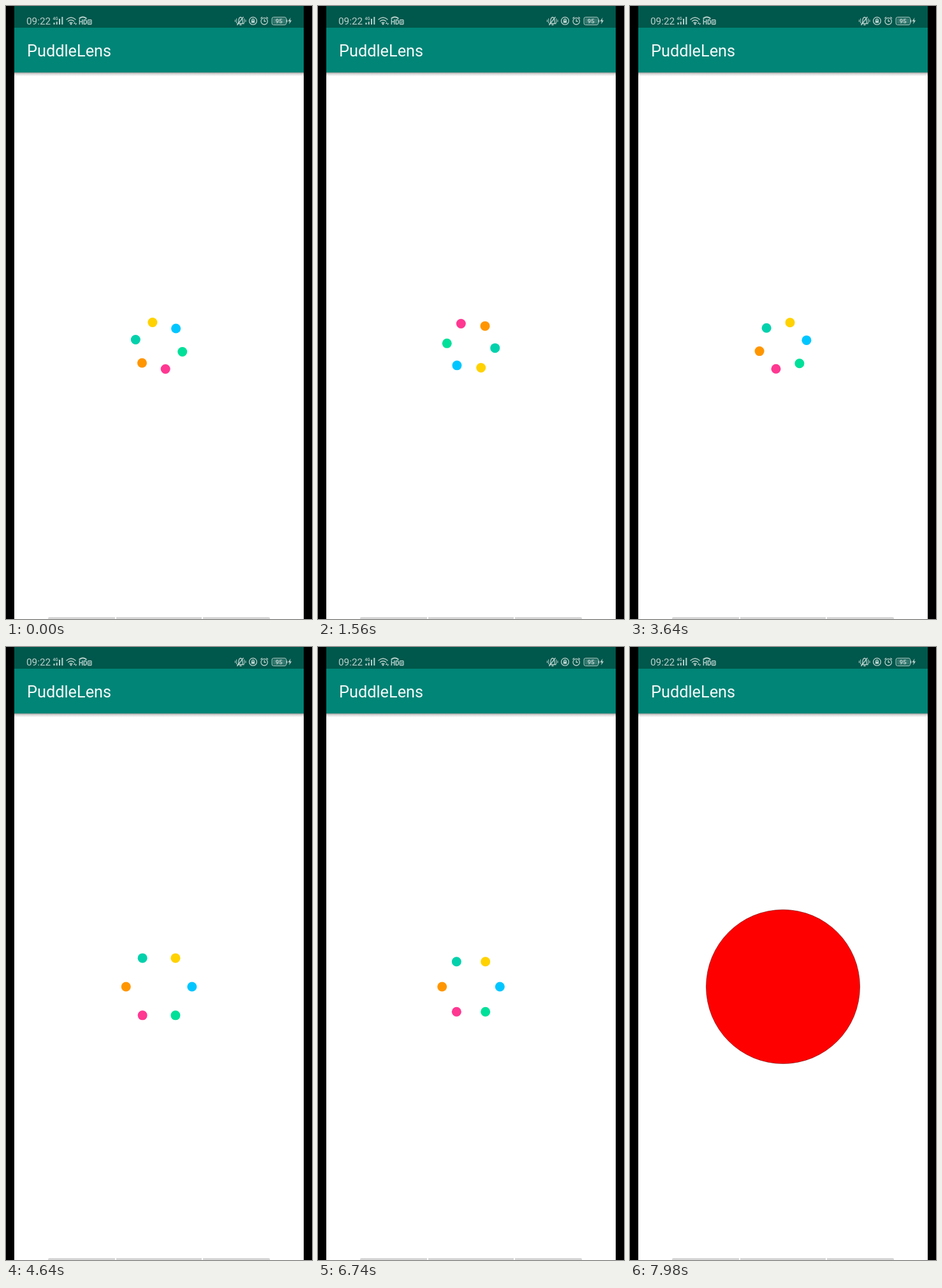
Animation, 480 px wide and 960 px high, one loop 8 s. Source, as an HTML page:

```html
<!DOCTYPE html>
<html lang="en">
<head>
<meta charset="utf-8">
<title>Loading dots</title>
<style>
  html, body { margin: 0; width: 100%; height: 100%; overflow: hidden; background: #000; }
  svg { display: block; width: 100%; height: 100%; }
  text { font-family: Roboto, sans-serif; }
  .line { fill: none; stroke: #b9d1cd; stroke-width: 1.3; }
  .solid { fill: #b9d1cd; }
</style>
</head>
<body>
<svg viewBox="0 0 480 960">
  <defs>
    <linearGradient id="shadow" x2="0" y2="1">
      <stop stop-color="#8f9492"/>
      <stop offset=".35" stop-color="#d5d5d5"/>
      <stop offset="1" stop-color="#fff"/>
    </linearGradient>
  </defs>
  <rect width="480" height="960" fill="#000"/>
  <rect x="13" width="454" height="960" fill="#fff"/>
  <rect x="13" y="104" width="454" height="6" fill="url(#shadow)"/>
  <rect x="13" y="33" width="454" height="71" fill="#008577"/>
  <rect x="13" width="454" height="34" fill="#00574b"/>
  <text x="33" y="78.5" font-size="25.3" fill="#f4faf9">PuddleLens</text>

  <!-- status bar, left -->
  <g class="solid">
    <text x="32" y="29" font-size="15.3">09:22</text>
    <text x="73.5" y="22" font-size="6.5" font-weight="500">4G</text>
    <path d="M74.5 26h2v3h-2zM78.700 24.500h2v4.500h-2zM83 20h2v9h-2zM87.300 17h2v12h-2z"/>
    <circle cx="102" cy="28" r="1.5"/>
    <text x="114" y="29.300" font-size="10" font-weight="700">HD</text>
    <path d="M106 28l1.700-3 1.700 3zM108 27l1.500 3 1.500-3z"/>
  </g>
  <g class="line">
    <path d="M94.500 21.500q7.500-7 15 0M97 24.300q5-4.500 10 0M99.500 26.800q2.500-2.300 5 0"/>
    <path d="M115.500 20.500v-1.500q5-3.500 10 0v1.500" stroke-width="2"/>
    <rect x="128.500" y="21.700" width="5.500" height="7" rx="1"/>
    <path d="M130 23.700h2.300v1.600h-2v1.700h2.400" stroke-width=".8"/>
  </g>

  <!-- status bar, right -->
  <g class="line">
    <path d="M363.500 27.500q1.500-1.500 1.500-4 0-5.500 3-6 3 .5 3 6 0 2.500 1.500 4zM366.500 29.500h3M362.500 30l10-13"/>
    <path d="M361.700 19.500v7.500M359.500 21.500v3.500M373.800 19.500v7.500M376 21.500v3.500" stroke-width="1"/>
    <circle cx="387.500" cy="23.300" r="5.900"/>
    <path d="M385.700 23v-1.500q1.800-2.500 3.600 0v1.500"/>
    <circle cx="405.200" cy="23.800" r="5.200"/>
    <path d="M405.200 20.500v3.500h2.500M399.500 19.500l2.500-2.300M408.500 17.200l2.500 2.300"/>
    <rect x="417.200" y="17.500" width="22.300" height="12" rx="2.500" stroke-width="1"/>
  </g>
  <g class="solid">
    <path d="M384.800 22.700h5.400v3.800h-5.400zM440.300 21.500h1.200v4h-1.200zM446.500 18l-4 6h2.400l-.8 4.500 4-6h-2.500z"/>
    <rect x="418.700" y="19" width="19.300" height="9" rx="1" opacity=".28"/>
    <text x="428.300" y="27" font-size="9.500" font-weight="700" text-anchor="middle">95</text>
  </g>

  <path d="M66 960v-1q0-2 2-2h103v3zM173 957h134v3h-134zM309 957h103q2 0 2 2v1h-105z" fill="#d6d6d6"/>
  <g id="dots"></g>
  <circle id="hole" cx="240" cy="532" fill="#f00" stroke="#500" stroke-opacity=".65" stroke-width=".8"/>
</svg>
<script>
const LOOP = 8000, CX = 240, CY = 532;
const DOT = 7.5, ORBIT = 37.9, REACH = 484.5, TENSION = 10;
// Phases are measured in animation steps
const PHASE = 71.5, MERGE_START = 83.05, EXPAND_START = 155.05;
const START_ANGLE = 314.5, TURN = 5.031, END_ANGLE = 720;
const COLORS = ['#00c6ff', '#00e099', '#ff3892', '#ff9600', '#02d1ac', '#ffd200'];

const group = document.getElementById('dots');
const hole = document.getElementById('hole');
const dots = COLORS.map(color => {
  const dot = document.createElementNS('http://www.w3.org/2000/svg', 'circle');
  dot.setAttribute('r', DOT);
  dot.setAttribute('fill', color);
  return group.appendChild(dot);
});

// Steps are held for 20, 20 and 100 ms in turn
function stepAt(time) {
  const shifted = time + 20, phase = shifted % 140;
  return 3 * Math.floor(shifted / 140) + (phase < 20 ? 0 : phase < 40 ? 1 : 2);
}

// Overshoot easing played backwards, from 1 to 0
const reverseOvershoot = u => 1 + u * u * (TENSION - (TENSION + 1) * u);

function draw(time) {
  const step = stepAt(time);
  const expanding = step >= EXPAND_START;
  group.style.display = expanding ? 'none' : '';
  hole.style.display = expanding ? '' : 'none';
  if (expanding) {
    hole.setAttribute('r', DOT + (REACH - DOT) * (step - EXPAND_START) / PHASE);
    return;
  }
  const merge = Math.min(1, Math.max(0, (step - MERGE_START) / PHASE));
  const radius = DOT + (ORBIT - DOT) * reverseOvershoot(merge);
  const angle = Math.min(END_ANGLE, START_ANGLE + TURN * (step - 1));
  dots.forEach((dot, i) => {
    const a = (angle + i * 60) * Math.PI / 180;
    dot.setAttribute('cx', CX + radius * Math.cos(a));
    dot.setAttribute('cy', CY + radius * Math.sin(a));
  });
}

const start = performance.now();
function tick() {
  draw((performance.now() - start) % LOOP);
  requestAnimationFrame(tick);
}
tick();
</script>
</body>
</html>
```
